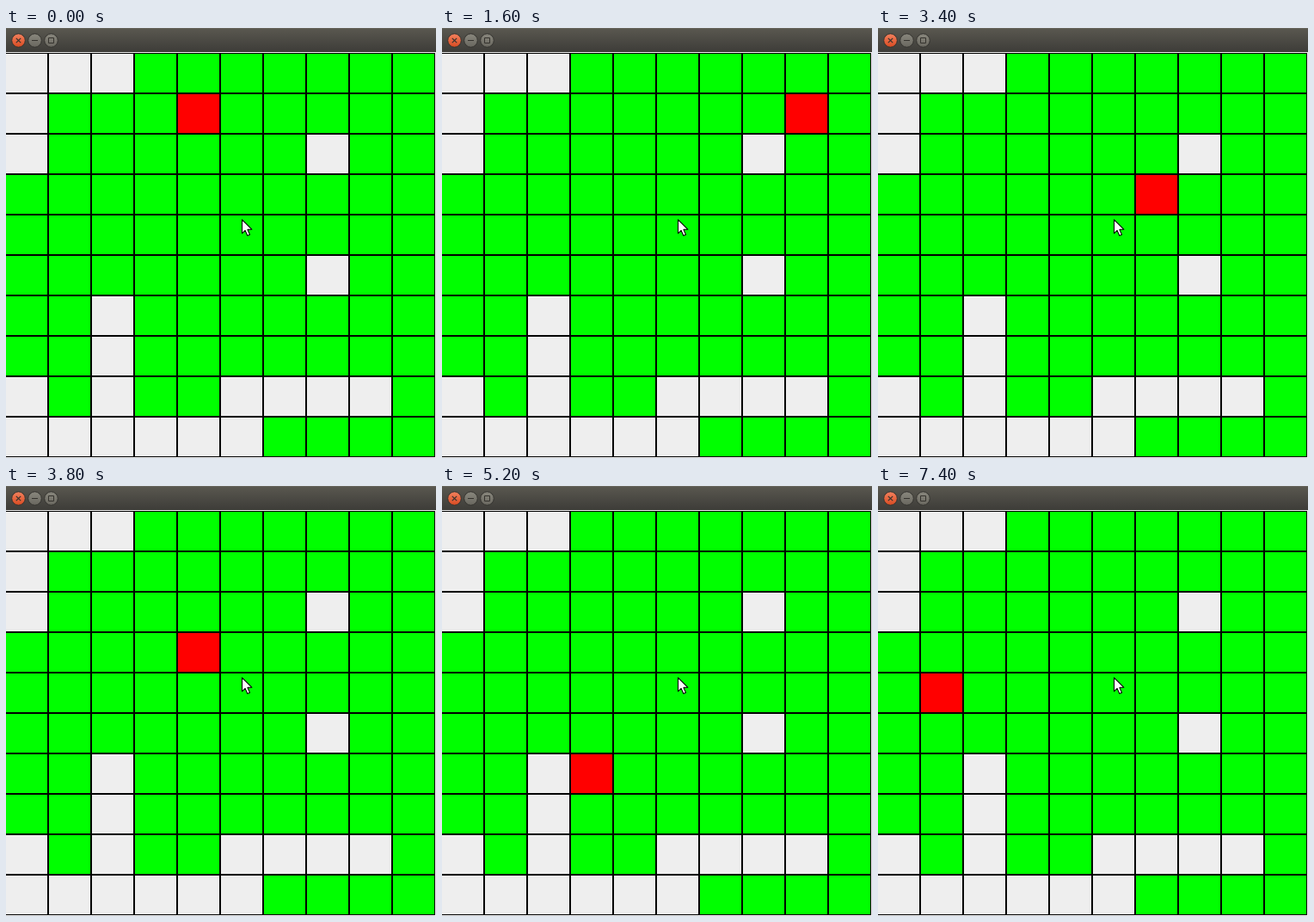
An HTML page with a canvas that plays this animation: 500 by 500 pixels, repeating every 8 s.

```html
<!DOCTYPE html>
<html lang="en">
<head>
<meta charset="utf-8">
<title>Grid walk</title>
<style>
  html, body { margin: 0; width: 100%; height: 100%; overflow: hidden; background: #eee; }
  canvas { display: block; width: 500px; height: 500px; }
</style>
</head>
<body>
<canvas id="stage" width="500" height="500"></canvas>
<script>
const ctx = document.getElementById('stage').getContext('2d');
const LOOP = 8000;
const CELL_W = 50, CELL_H = 47, TOP = 30;

// '#' is a walkable cell, '.' an empty one
const MAP = [
  '...#######',
  '.#########',
  '.######.##',
  '##########',
  '##########',
  '#######.##',
  '##.#######',
  '##.#######',
  '.#.##....#',
  '......####'
];

// One step per time, in the direction at the same index
const START = [4, 1];
const TIMES = [700, 1100, 1400, 1600, 2200, 2500, 3100, 3400, 3600,
  3800, 4100, 4600, 4900, 5200, 6400, 6700, 7200, 7400];
const MOVES = 'RRRRDDLLLLLDDDUULL';
const DIRS = { R: [1, 0], L: [-1, 0], D: [0, 1], U: [0, -1] };

function walkerAt(t) {
  let [col, row] = START;
  TIMES.forEach((time, i) => {
    if (t < time) return;
    const [dx, dy] = DIRS[MOVES[i]];
    col += dx;
    row += dy;
  });
  return [col, row];
}

function rect(x, y, w, h, color) {
  ctx.fillStyle = color;
  ctx.fillRect(x, y, w, h);
}

function line(points, color, width = 1) {
  ctx.beginPath();
  points.forEach(([x, y]) => ctx.lineTo(x, y));
  ctx.strokeStyle = color;
  ctx.lineWidth = width;
  ctx.stroke();
}

function shade(y0, y1, from, to) {
  const g = ctx.createLinearGradient(0, y0, 0, y1);
  g.addColorStop(0, from);
  g.addColorStop(1, to);
  return g;
}

function button(x, from, to) {
  ctx.beginPath();
  ctx.arc(x, 14.5, 7.8, 0, Math.PI * 2);
  ctx.fillStyle = shade(6, 23, from, to);
  ctx.fill();
  ctx.strokeStyle = '#34332f';
  ctx.lineWidth = 1;
  ctx.stroke();
}

function drawTitleBar() {
  rect(0, 0, 500, 28, shade(0, 28, '#5a5850', '#3d3c38'));
  rect(0, 0, 500, 1, '#65635a');
  button(14.5, '#f58461', '#d8491f');
  button(33.5, '#8b897f', '#67655d');
  button(52.5, '#8b897f', '#67655d');

  const ink = '#35332e';
  line([[11.8, 11.8], [17.2, 17.2]], ink, 1.2);
  line([[17.2, 11.8], [11.8, 17.2]], ink, 1.2);
  line([[30, 14.5], [37, 14.5]], ink);
  ctx.strokeRect(49.5, 11.5, 6, 6);
}

function drawGrid([col, row]) {
  MAP.forEach((cells, r) => [...cells].forEach((cell, c) => {
    const x = c * CELL_W, y = TOP + r * CELL_H;
    const here = c === col && r === row;
    const color = here ? '#f00' : cell === '#' ? '#0f0' : '#eee';
    rect(x - 1, y - 1, CELL_W, CELL_H, '#000');
    rect(x, y, CELL_W - 2, CELL_H - 2, color);
  }));
}

function drawPointer() {
  ctx.beginPath();
  [[274.5, 222.8], [274.5, 238.8], [278.1, 235.4], [280.8, 241.5],
   [283.5, 240.3], [280.9, 234.4], [285.8, 234.2]]
    .forEach(([x, y]) => ctx.lineTo(x, y));
  ctx.closePath();
  ctx.fillStyle = '#fff';
  ctx.fill();
  ctx.strokeStyle = '#000';
  ctx.lineWidth = 1.1;
  ctx.lineJoin = 'round';
  ctx.stroke();
}

function draw(t) {
  rect(0, 0, 500, 500, '#eee');
  drawTitleBar();
  drawGrid(walkerAt(t));
  drawPointer();
}

const begin = performance.now();
function tick() {
  draw((performance.now() - begin) % LOOP);
  requestAnimationFrame(tick);
}
tick();
</script>
</body>
</html>
```
